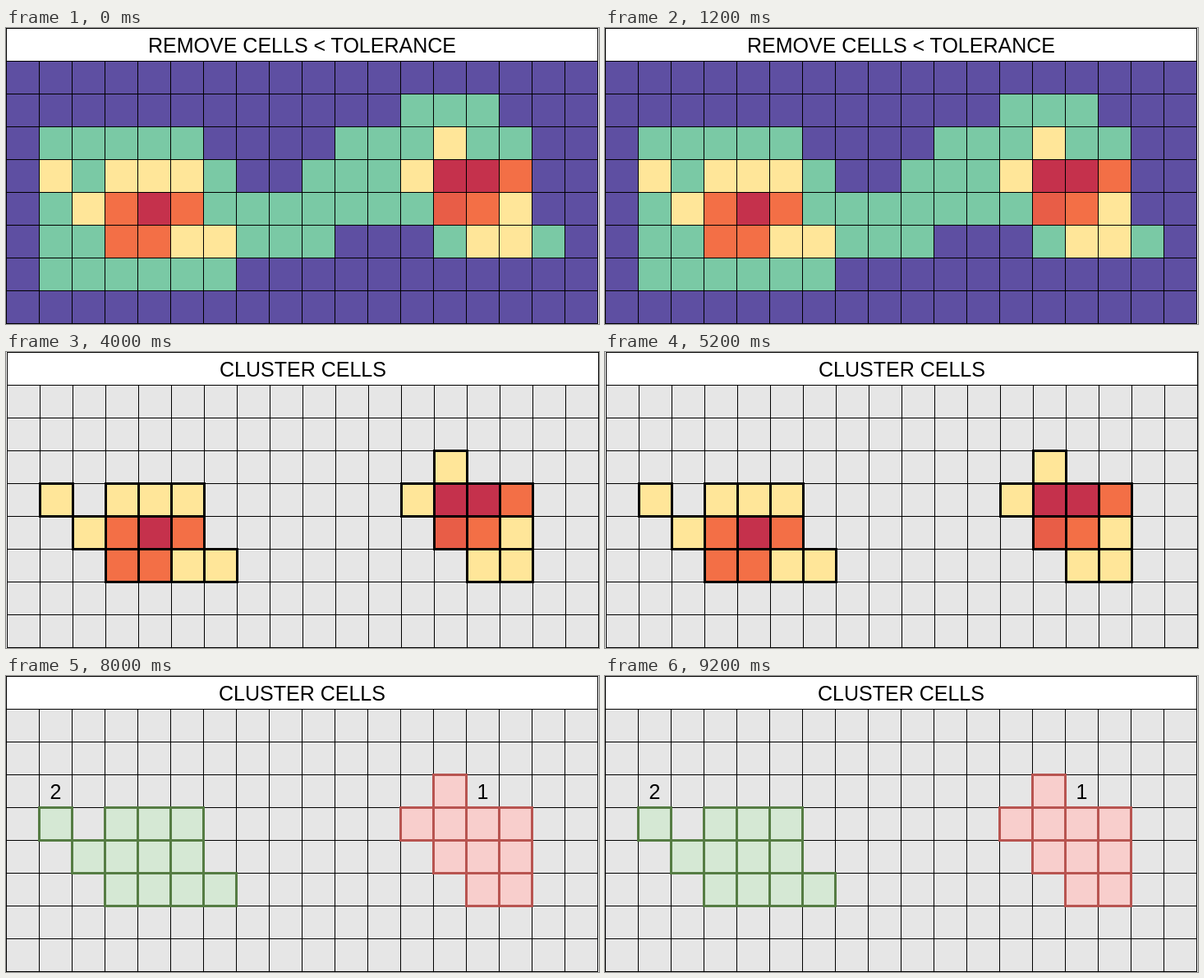
These frames come from a looping animation (722x361 px, 10 s). An HTML page:

```html
<!DOCTYPE html>
<html lang="en">
<head>
<meta charset="utf-8">
<title>Cell clustering</title>
<style>
  html, body { margin: 0; width: 100%; height: 100%; overflow: hidden; background: #fff; }
  svg { display: block; width: 722px; height: 361px; }
  text { font: 25px "Liberation Sans", Arial, sans-serif; text-anchor: middle; }
</style>
</head>
<body>
<svg viewBox="0 0 722 361"><g id="board"></g></svg>
<script>
const SIZE = 40, STEP = 2000;
const HEAT = [
  "..................",
  "............ggg...",
  ".ggggg....gggygg..",
  ".ygyyyg..gggyrro..",
  ".gyorogggggggvoy..",
  ".ggooyyggg...gyyg.",
  ".gggggg...........",
  ".................."
];
const COLORS = {
  ".": "#5e4fa2", g: "#7ac9a5", y: "#ffe699", o: "#f36f46", v: "#e85d47", r: "#c5314c"
};
const CLUSTERS = [
  { label: 1, col: 14, row: 2, fill: "#f8cecc", stroke: "#b85450" },
  { label: 2, col: 1, row: 2, fill: "#d5e8d4", stroke: "#557c43" }
];
const REMOVE = "REMOVE CELLS < TOLERANCE", CLUSTER = "CLUSTER CELLS";
const STAGES = [
  { title: REMOVE, heat: true, found: 0, shift: 0 },
  { title: REMOVE, heat: false, found: 0, shift: 0 },
  { title: CLUSTER, heat: false, found: 0, shift: 1 },
  { title: CLUSTER, heat: false, found: 1, shift: 1 },
  { title: CLUSTER, heat: false, found: 2, shift: 0 }
];

const board = document.getElementById("board");
const cells = HEAT.flatMap((line, row) =>
  [...line].map((kind, col) => ({ kind, row, col, cluster: col > 8 ? 0 : 1 })));
const hot = cells.filter(c => !".g".includes(c.kind));

function add(tag, attrs, content = "") {
  const node = document.createElementNS("http://www.w3.org/2000/svg", tag);
  for (const key in attrs) node.setAttribute(key, attrs[key]);
  node.textContent = content;
  board.append(node);
}

function box(col, row, fill, stroke = "#000", weight = 1, span = 1) {
  add("rect", {
    x: col * SIZE + 0.5, y: row * SIZE + 40.5, width: SIZE * span, height: SIZE,
    fill, stroke, "stroke-width": weight
  });
}

function label(x, y, content) {
  add("text", { x, y }, content);
}

function draw({ title, heat, found, shift }) {
  board.replaceChildren();
  board.setAttribute("transform", `translate(${shift} 0)`);
  box(0, -1, "#fff", "#000", 1, 18);
  label(360.5, 30, title);
  for (const c of cells) box(c.col, c.row, heat ? COLORS[c.kind] : "#e6e6e6");
  if (heat) return;
  for (const c of hot) {
    const { fill, stroke } = c.cluster < found
      ? CLUSTERS[c.cluster] : { fill: COLORS[c.kind], stroke: "#000" };
    box(c.col, c.row, fill, stroke, 3);
  }
  for (const c of CLUSTERS.slice(0, found)) {
    label((c.col + 0.5) * SIZE + 0.5, c.row * SIZE + 70, c.label);
  }
}

let shown = -1;
function tick() {
  const stage = Math.floor(performance.now() / STEP) % STAGES.length;
  if (stage !== shown) draw(STAGES[shown = stage]);
  requestAnimationFrame(tick);
}
tick();
</script>
</body>
</html>
```
